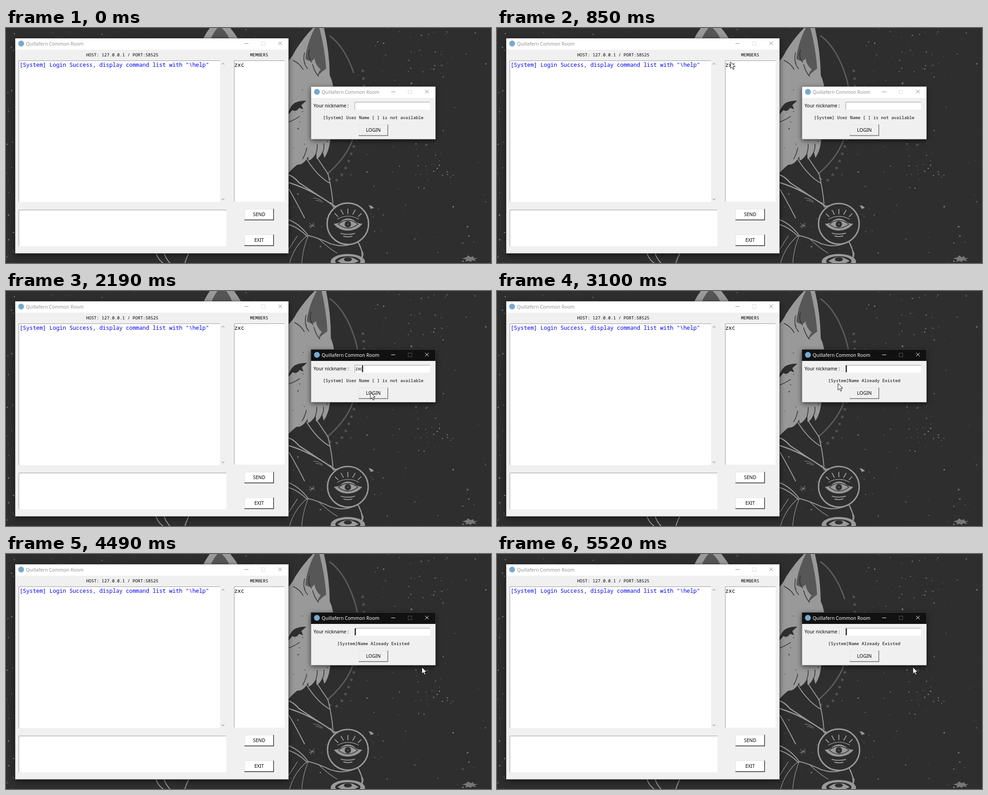
Recreate the animation shown at these times as an HTML page. Size 1074x521 px, loop 5600 ms.

```html
<!DOCTYPE html>
<html lang="en">
<head>
<meta charset="utf-8">
<title>Chat login</title>
<style>
  html, body { margin: 0; width: 100%; height: 100%; overflow: hidden; background: #2e2e2e; }
  svg { display: block; width: 1074px; height: 521px; }
  text { font: 10.4px "Noto Sans", "Open Sans", sans-serif; white-space: pre; }
  .mono { font: 9.53px "Noto Sans Mono", "DejaVu Sans Mono", monospace; }
  .chat { font-size: 12.28px; }
  .mid { text-anchor: middle; }
  .line { fill: none; stroke: #999; stroke-width: 2; stroke-linecap: round; stroke-linejoin: round; }
  .ink { fill: none; stroke: #2e2e2e; stroke-width: 1.5; stroke-linecap: round; }
  .light { fill: #999; }
  .dark { fill: #2e2e2e; }
  .ring { fill: none; stroke: #5c5c5c; stroke-width: 3; }
  .window { filter: drop-shadow(0 3px 6px #0009); }
  .border { fill: none; stroke: #555; stroke-opacity: .55; }
</style>
</head>
<body>
<svg viewBox="0 0 1074 521">
  <rect width="1074" height="521" class="dark"/>
  <g id="stars"></g>
  <path d="M1010 511l10 -3 3 -4 6 4 6 -2 1 4 9 0 -8 3 5 4 -10 -2 -3 4 -4 -3 -8 2 2 -5z" fill="#777"/>
  <path d="M803 393l6 1 6 5 -7 2z" class="light"/>

  <g id="halo">
    <path class="ring" d="M716 17C740 33 759 66 770 100"/>
    <path class="ring" id="haloEnd" d="M770 100Q777 118 779 140"/>
    <path class="ring" d="M772 230Q764 278 711 324"/>
    <path d="M790 95Q800 170 769 266T715 332" fill="none" stroke="#505050" stroke-width="6" stroke-linecap="round" stroke-dasharray="0 17"/>
  </g>

  <g id="body">
    <g class="line">
      <path d="M332 499Q337 514 349 522M350 499Q354 512 364 522M405 499Q399 511 396 522"/>
      <path d="M666 291Q690 329 717 344M688 286Q701 306 713 323Q721 355 724 389"/>
      <path d="M627 326Q638 330 649 343Q689 370 730 396M627 343Q676 358 721 391" stroke-width="2.6"/>
      <path d="M627 358Q647 393 661 421M626 425Q651 435 669 460Q691 465 720 479M627 436Q647 442 667 462"/>
      <path d="M667 460Q638 484 628 521M645 461Q633 480 621 499M669 461Q657 490 655 521M691 466Q714 488 733 499" stroke-width="1.2"/>
      <path d="M722 479Q752 489 779 473L791 501 786 521M780 475Q790 491 788 510"/>
      <path d="M681 377q12 0 20 8M686 382q8 0 14 5M672 433l11 9M682 432l-8 12M671 440l12 -3" stroke-width="1"/>
      <path d="M719 387L725 397 734 394"/>
    </g>
    <path id="knot" class="light" d="M630 342Q640 335 643 325Q654 324 664 331Q670 340 661 348Q653 356 645 349Q637 353 628 348Z"/>
    <g id="medal">
      <circle cx="757" cy="434" r="45" fill="#2e2e2e" stroke="#999" stroke-width="3"/>
      <path class="light" d="M726 434Q739 434 744 427Q757 418 771 427Q776 434 789 434Q777 449 757 449Q738 449 726 434Z"/>
      <path class="ink" d="M736 435Q757 418 779 435Q757 452 736 435Z"/>
      <circle cx="757" cy="435" r="7" class="dark"/>
      <circle cx="757" cy="435" r="2" fill="#555"/>
      <path d="M734 424Q757 411 781 424" fill="none" stroke="#999" stroke-width="1.3"/>
      <path class="line" d="M757 402v10M742 404l5 9M773 404l-5 9M729 412l6 6M786 412l-6 6M742 455Q757 459 772 455M748 461Q757 464 766 461"/>
    </g>
    <ellipse cx="757" cy="518" rx="38" ry="17" class="light"/>
    <ellipse cx="757" cy="517" rx="28" ry="11" class="dark"/>
    <path class="light" d="M734 517Q757 499 781 517L769 522H745Z"/>
    <ellipse cx="757" cy="513" rx="9" ry="4.500" class="dark"/>
  </g>

  <g id="head">
    <path class="light" d="M378 122Q420 58 437 23Q445 6 459 -9L488 -10Q502 5 514 24L560 110Z"/>
    <path d="M449 36Q456 12 472 -4Q491 8 499 36L490 110H420Z" fill="#555"/>
    <path class="light" d="M590 100Q627 80 640 51Q661 18 681 -1Q690 -26 699 -20Q716 41 717 105Q729 130 725 170Q731 200 718 247Q716 272 705 288L701 273Q697 285 688 291L687 277Q678 292 670 294L669 285Q659 304 645 303Q637 309 627 320L570 330Z"/>
    <path d="M662 84Q662 40 686 -4L692 -8Q706 44 709 90Q697 98 690 107Q670 98 662 84Z" fill="#575757"/>
    <path class="light" d="M658 90Q666 80 661 67Q677 79 683 67Q685 82 697 92Q690 98 690 109Z"/>
    <path class="ink" d="M672 48Q667 65 677 76M661 55Q656 77 668 90M679 81Q683 97 692 107M636 72Q650 78 658 92"/>
    <path class="dark" d="M622 196Q630 169 642 165Q651 161 665 161L654 171 658 180 649 177Q643 187 634 182Z"/>
    <path class="ink" d="M627 208Q638 204 650 196M657 290Q664 278 666 266M686 279Q690 268 689 258M702 274Q705 266 704 257"/>
    <g id="freckles"></g>
  </g>

  <g class="window">
    <rect x="20" y="23" width="606" height="477" fill="#f0f0f0"/>
    <rect x="20" y="23" width="606" height="25" fill="#fff"/>
  </g>
  <rect class="border" x="20.5" y="22.5" width="605" height="477"/>
  <circle cx="33.5" cy="34.5" r="6.5" fill="#77a9cf"/>
  <text x="44" y="38.5" fill="#929292">Quillafern Common Room</text>
  <g fill="none" stroke="#888"><path d="M528 34.5h9M603 30l8 8m0 -8l-8 8"/><rect x="565.5" y="30.5" width="8" height="8" stroke="#ddd"/></g>
  <text class="mono mid" x="257.5" y="63">HOST: 127.0.0.1 / PORT:58525</text>
  <text class="mono mid" x="560.5" y="63">MEMBERS</text>
  <g id="fields"></g>
  <path d="M477.5 81l3 -3 3 3M477.5 378l3 3 3 -3" fill="none" stroke="#aaa" stroke-width="1.3"/>
  <text class="mono chat" x="30" y="86" fill="#0000f0">[System] Login Success, display command list with "\help"</text>
  <text class="mono chat" x="505.5" y="86">zxc</text>

  <g class="window">
    <rect x="675" y="130" width="276" height="117" fill="#f0f0f0"/>
    <rect id="bar" x="675" y="130" width="276" height="25"/>
  </g>
  <rect class="border" x="675.5" y="129.5" width="276" height="117"/>
  <circle cx="688.5" cy="141.5" r="6.5" fill="#77a9cf"/>
  <text id="title" x="699" y="145.5">Quillafern Common Room</text>
  <g id="controls" fill="none"><path d="M853 141.5h9M928 137l8 8m0 -8l-8 8"/><rect id="maxBox" x="890.5" y="137.5" width="8" height="8"/></g>
  <text x="681" y="176">Your nickname :</text>
  <g id="loginField"></g>
  <text id="entry" x="774" y="176"></text>
  <rect id="caret" y="165" width="2" height="15"/>
  <text id="status" class="mono mid" x="813.2" y="201.5"></text>
  <g id="buttons"></g>
  <path id="cursor" d="M0 0V14.5L3.5 11.5 6 17 8.3 16 6 10.5H10.5Z" fill="#fff" stroke="#111"/>
</svg>
<script>
const LOOP = 5600, SWAY = 450, ACTIVATE = 1660, LOGIN = 2600;
const KEYS = [1740, 1830, 1910];
// Pointer stops: time, x, y
const STOPS = [
  [70, 936, 196], [600, 520, 79], [850, 517, 75], [950, 517, 75], [1240, 780, 164], [1500, 835, 172],
  [1950, 838, 176], [2170, 807, 225], [2600, 807, 226], [2780, 992, 216], [3080, 755, 205],
  [3180, 755, 205], [3650, 902, 206], [3820, 921, 251]
];
const $ = id => document.getElementById(id);
const set = (id, attrs) => { for (const k in attrs) $(id).setAttribute(k, attrs[k]); };

let seed = 7;
const rand = () => (seed = seed * 16807 % 2147483647) / 2147483647;
const dot = (x, y, r, fill) => `<circle cx="${x}" cy="${y}" r="${r}" fill="${fill}"/>`;

function scatter(count, x, y, w, h, size, low, range) {
  let out = '';
  for (let i = 0; i < count; i++) {
    const v = Math.round(low + rand() * range);
    out += dot(x + rand() * w, y + rand() * h, .4 + rand() ** 3 * size, `rgb(${v},${v},${v})`);
  }
  return out;
}

function field(x, y, w, h) {
  return `<rect x="${x}" y="${y}" width="${w}" height="${h}" fill="#fff"/>
    <path d="M${x + .5} ${y + h}V${y + .5}H${x + w}" fill="none" stroke="#999"/>`;
}

function button(x, y, label, fill, edge) {
  return `<rect x="${x}" y="${y}" width="65" height="25" fill="${fill}"/>
    <path d="M${x + .5} ${y + 25}V${y + .5}H${x + 65}" fill="none" stroke="#e3e3e3"/>
    <path d="M${x} ${y + 24.5}H${x + 64.5}V${y}" fill="none" stroke="${edge}" stroke-width="1.4"/>
    <text class="mid" x="${x + 32.5}" y="${y + 16}">${label}</text>`;
}

$('stars').innerHTML = scatter(210, 626, 0, 448, 521, 1.5, 60, 80)
  + scatter(45, 905, 245, 75, 90, 1.5, 75, 75)
  + scatter(60, 800, 0, 180, 130, 1.6, 75, 65)
  + scatter(45, 0, 0, 20, 521, 1.5, 70, 70)
  + scatter(35, 20, 0, 606, 22, 1, 60, 50);
$('freckles').innerHTML = scatter(24, 630, 110, 85, 160, 1, 45, 15);
$('fields').innerHTML = field(28, 72, 446, 314) + field(505, 72, 112, 313) + field(28, 403, 460, 81);
$('loginField').innerHTML = field(772, 164, 167, 17);
$('buttons').innerHTML = button(528, 401, 'SEND', '#fff', '#222')
  + button(528, 458, 'EXIT', '#fff', '#222') + button(781, 214, 'LOGIN', '#f0f0f0', '#666');

function pointerAt(t) {
  let i = 0;
  while (i < STOPS.length - 1 && t >= STOPS[i + 1][0]) i++;
  const a = STOPS[i], b = STOPS[i + 1] || a;
  const u = a === b ? 0 : Math.max(0, (t - a[0]) / (b[0] - a[0]));
  const e = u * u * (3 - 2 * u);
  return [a[1] + (b[1] - a[1]) * e, a[2] + (b[2] - a[2]) * e];
}

function drawWallpaper(t) {
  const phase = t % SWAY;
  const lift = phase > 130 && phase < 400 ? Math.min(1, 1.8 * Math.sin(Math.PI * (phase - 130) / 270)) : 0;
  const rest = phase < 130;
  set('head', { transform: `translate(${2 * lift} ${-9 * lift}) rotate(${6.5 * lift} 650 200)` });
  set('halo', { transform: `translate(${2 * lift} ${-2 * lift})` });
  set('haloEnd', { opacity: rest ? 0 : 1 });
  set('knot', { opacity: lift > .5 ? 1 : 0 });
  set('body', { transform: `translate(0 ${.6 * lift})` });
  set('medal', { transform: `translate(757 434) scale(${rest ? 1.02 : 1}) translate(-757 -434)` });
}

function drawLogin(t) {
  const active = t >= ACTIVATE;
  const typed = t < LOGIN ? KEYS.filter(k => t >= k).length : 0;
  set('bar', { fill: active ? '#111' : '#fff' });
  set('title', { fill: active ? '#fff' : '#929292' });
  set('controls', { stroke: active ? '#fff' : '#888' });
  set('maxBox', { stroke: active ? '#555' : '#ddd' });
  $('entry').textContent = 'zxc'.slice(0, typed);
  const width = typed ? $('entry').getComputedTextLength() : -1;
  set('caret', { x: 773.5 + width, opacity: active && (t + 140) % 900 < 600 ? 1 : 0 });
  $('status').textContent = t < LOGIN
    ? '[System] User Name [ ] is not available' : '[System]Name Already Existed';
}

const start = performance.now();
function frame(now) {
  const t = Math.max(0, now - start) % LOOP;
  drawWallpaper(t);
  drawLogin(t);
  set('cursor', { transform: `translate(${pointerAt(t)})`, opacity: t < 70 ? 0 : 1 });
  requestAnimationFrame(frame);
}
frame(start);
</script>
</body>
</html>
```
